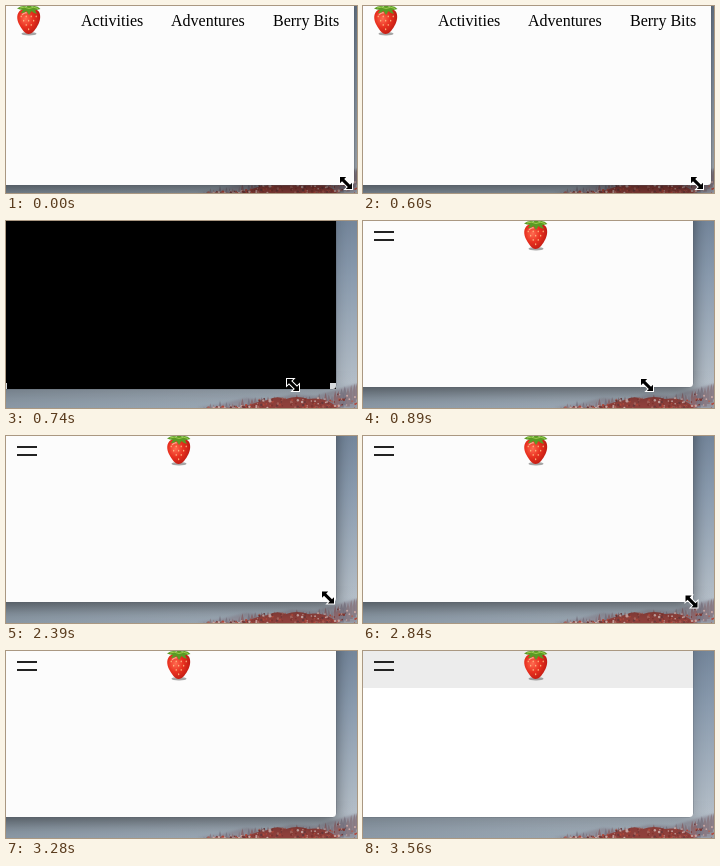
Animation of 351x187 px, one loop 3.66 s. Source, as an HTML page:

```html
<!DOCTYPE html>
<html lang="en">
<head>
<meta charset="utf-8">
<title>Responsive menu</title>
<style>
  html, body { margin: 0; width: 100%; height: 100%; overflow: hidden; background: #8996a3; }
  svg { display: block; width: 100%; height: 100%; }
  text { font: 16px "Liberation Serif", "Times New Roman", serif; fill: #000; }
</style>
</head>
<body>
<svg viewBox="0 0 351 187">
  <defs>
    <linearGradient id="sky" x2="0" y2="1">
      <stop offset="0" stop-color="#74869b"/>
      <stop offset=".3" stop-color="#8a9bae"/>
      <stop offset=".65" stop-color="#a4b1be"/>
      <stop offset=".86" stop-color="#b3bdc7"/>
      <stop offset="1" stop-color="#9facb8"/>
    </linearGradient>
    <linearGradient id="haze">
      <stop offset="0" stop-color="#84929f" stop-opacity=".75"/>
      <stop offset=".6" stop-color="#8b9aa8" stop-opacity=".3"/>
      <stop offset="1" stop-color="#8b9aa8" stop-opacity="0"/>
    </linearGradient>
    <radialGradient id="red" cx=".36" cy=".4" r=".75">
      <stop offset="0" stop-color="#ff6a50"/>
      <stop offset=".45" stop-color="#e8301f"/>
      <stop offset="1" stop-color="#b3140f"/>
    </radialGradient>
    <filter id="blur" x="-20%" y="-20%" width="140%" height="150%">
      <feGaussianBlur stdDeviation="8"/>
    </filter>
    <filter id="soft"><feGaussianBlur stdDeviation="1"/></filter>
  </defs>

  <rect width="351" height="187" fill="url(#sky)"/>
  <rect y="150" width="351" height="37" fill="url(#haze)"/>
  <path d="M190 187L215 183L240 177L262 179L285 174L310 175L332 168L351 163V187Z" fill="#8d8995" opacity=".7" filter="url(#soft)"/>
  <g id="trees"></g>

  <rect id="shadow" x="-30" y="-20" rx="4" filter="url(#blur)"/>
  <rect id="edge" x="-10" y="-10" rx="4" fill="none" stroke="#59626c" stroke-opacity=".55"/>
  <rect id="page" x="-10" y="-10" rx="3.5"/>
  <g id="blank">
    <rect width="330" height="168"/>
    <path d="M0 162h1v6h-1zM324 162h6v3q0 3-3 3h-3z" fill="#d5d9dc"/>
  </g>
  <rect id="bar" width="330" height="37" fill="#ececec"/>
  <g id="links">
    <text x="75" y="20">Activities</text>
    <text x="165" y="20">Adventures</text>
    <text x="267" y="20">Berry Bits</text>
  </g>
  <path id="burger" d="M11 11h20M11 19h20" stroke="#222" stroke-width="2"/>

  <g id="berry">
    <ellipse cx="0" cy="26.8" rx="7.5" ry="1.7" fill="#777" opacity=".65"/>
    <path d="M-8 3C-13 6-12.500 13-9.500 18C-7 22.500-4 27-.5 27C3.500 27 7 22 9.500 17C12 12 12 5 8 3C4 1-4 1-8 3Z" fill="url(#red)"/>
    <path id="seeds" stroke="#ffc58a" stroke-width="1.1" stroke-linecap="round"/>
    <path d="M-7 8Q-5 5-2 6" stroke="#ffb6a2" stroke-width="1.300" fill="none" opacity=".8"/>
    <path d="M-12 1.500Q-7-2-2-.5L-1-4H2L2.500-.5Q8-2 11.500 2Q8 2.500 6 3.500L8 7Q4 6 2.500 4L0 8L-2.500 4Q-5 6.500-8 6L-6 3Q-9 2.500-12 1.500Z" fill="#5a9a25"/>
    <path d="M-9 1Q-5-1 0 1.500Q5-1 9 1.500" stroke="#9ccc4c" fill="none"/>
  </g>

  <path id="cursor" d="M-6-6H.2L-1.800-4L4 1.800L6-.2V6H-.2L1.800 4L-4-1.800L-6 .2Z"
        stroke="#fff" stroke-width="2" paint-order="stroke"/>
</svg>
<script>
const $ = id => document.getElementById(id);
const LOOP = 3660;

// [start ms, cursor x, cursor y]; no position means hidden
const moves = [
  [0, 340, 177], [600, 334, 177], [740, 287, 164], [890, 284, 164],
  [1340, 287, 174], [2390, 322, 161.5], [2540, 329.5, 163.5],
  [2690, 328.5, 164.5], [2840, 328.5, 165.5], [3130, 332, 187], [3280]
];

// [start ms, view, width, height, page colour, shadow opacity]
const views = [
  [0, 'wide', 348, 179, '#fcfcfc', .5],
  [740, 'blank', 330, 168, '#000', .22],
  [890, 'narrow', 330, 166, '#fcfcfc', .48],
  [3560, 'bar', 330, 166, '#fff', .2]
];

const at = (steps, t) => steps.findLast(s => s[0] <= t);
const show = (id, on) => $(id).setAttribute('visibility', on ? 'visible' : 'hidden');

function size(id, w, h) {
  $(id).setAttribute('width', w);
  $(id).setAttribute('height', h);
}

function drawTrees() {
  let seed = 11;
  const rnd = () => (seed = seed * 16807 % 2147483647) / 2147483647;
  const pick = list => list[Math.floor(rnd() * list.length)];
  let out = '';
  const ridge = x => 187 - (x - 195) * .07 - Math.max(0, x - 318) * .32;
  for (let x = 198; x < 352; x += 3.2) {
    const y = ridge(x) - 1 - rnd() * 6, w = 1.2 + rnd() * 1.2;
    out += `<path d="M${x} ${y}l${w} 7v12h${-2 * w}v-12z" fill="${pick(['#77707d', '#86717a', '#8c5f63'])}" opacity=".75"/>`;
  }
  out += '<path d="M236 187Q252 180 262 179Q270 174 280 178Q291 174 302 178Q316 176 327 183L331 187Z" fill="#91423d"/>';
  const tones = ['#b24a3d', '#823630', '#a8655d', '#c9a8a5', '#6c3a3c'];
  for (let i = 0; i < 190; i++) {
    const x = 200 + rnd() * 151, top = x > 250 && x < 328 ? 177 : ridge(x);
    const y = top + rnd() * (188 - top);
    out += `<circle cx="${x}" cy="${y}" r="${.5 + rnd() * .8}" fill="${pick(tones)}"/>`;
  }
  $('trees').innerHTML = out;
}

function drawSeeds() {
  let d = '';
  for (let row = 0; row < 4; row++) {
    const n = 4 - row;
    for (let i = 0; i < n; i++) d += `M${(i - (n - 1) / 2) * 5 - .3} ${9 + row * 4.3}v.7`;
  }
  $('seeds').setAttribute('d', d);
}

function render(t) {
  const [, view, w, h, fill, dark] = at(views, t);
  const [, x, y] = at(moves, t);
  const blank = view === 'blank', wide = view === 'wide';
  size('page', w + 10, h + 10);
  size('edge', w + 10, h + 10);
  size('shadow', w + 30, h + 26);
  $('page').setAttribute('fill', fill);
  $('shadow').setAttribute('opacity', dark);
  show('blank', blank);
  show('bar', view === 'bar');
  show('links', wide);
  show('burger', !wide && !blank);
  show('berry', !blank);
  $('berry').setAttribute('transform', `translate(${wide ? 23 : 173} 1)`);
  show('cursor', x !== undefined);
  if (x !== undefined) $('cursor').setAttribute('transform', `translate(${x} ${y})`);
}

drawTrees();
drawSeeds();
const start = performance.now();
function tick() {
  render((performance.now() - start) % LOOP);
  requestAnimationFrame(tick);
}
tick();
</script>
</body>
</html>
```
